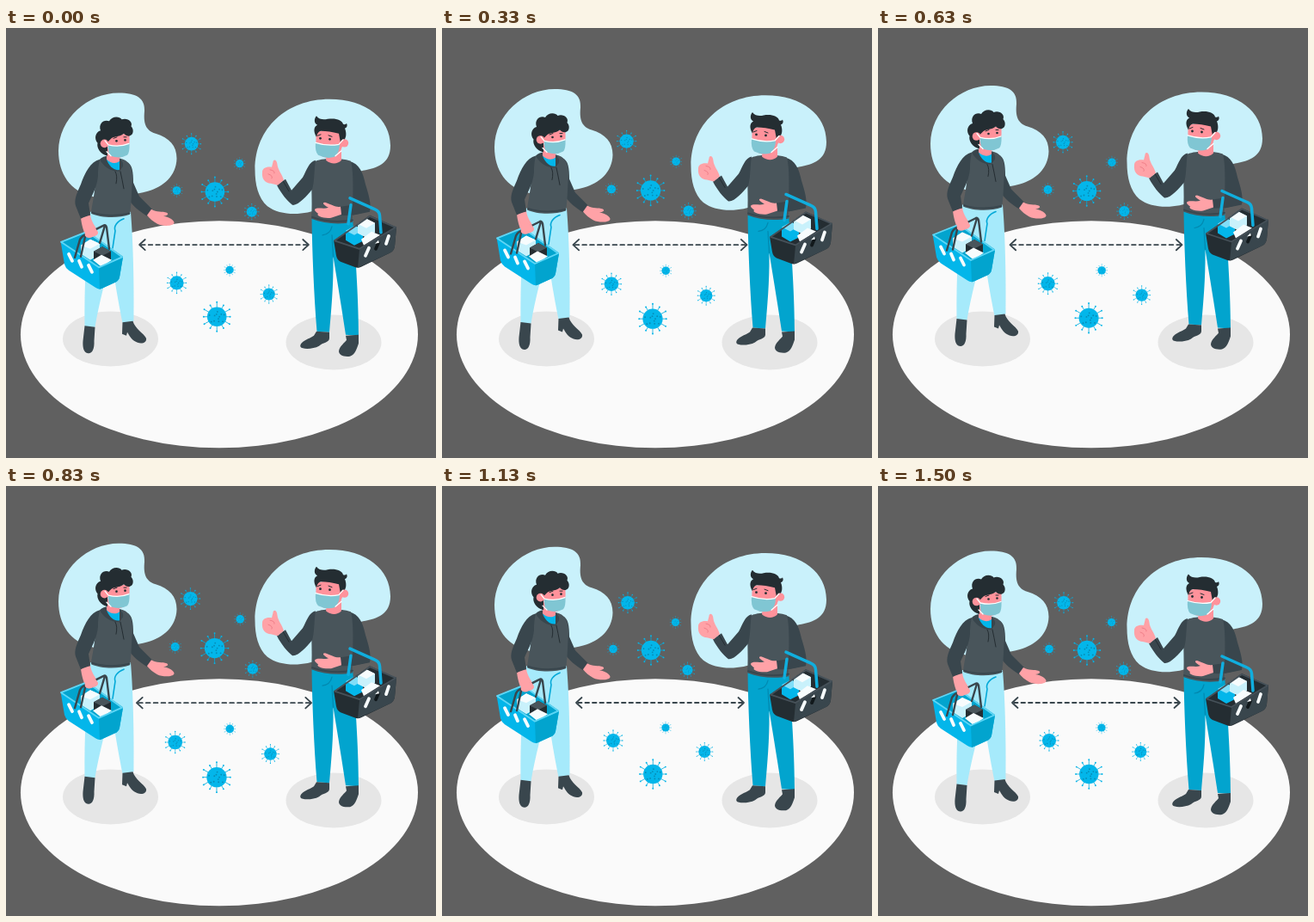
Recreate the animation shown at these times as an HTML page. Size 500 by 500 pixels, loop 1540 ms.

```html
<!DOCTYPE html>
<html lang="en">
<head>
<meta charset="utf-8">
<title>Keep your distance</title>
<style>
  html, body { margin: 0; width: 100%; height: 100%; overflow: hidden; background: #606060; }
  svg { display: block; width: 100vw; height: 100vh; }
  .blob { fill: #c9f1fb; }
  .skin { fill: #ffa2a7; }
  .face { fill: #ff929b; }
  .hair { fill: #242d32; }
  .dark { fill: #39464d; }
  .top { fill: #49555b; }
  .cyan { fill: #03b6ea; }
  .pale { fill: #a6eafb; }
  .blue { fill: #02a4ce; }
  .white { fill: #f7fcfd; }
  .mask { fill: #80c6d3; }
  .line { fill: none; stroke: #39464d; stroke-width: 1.8; stroke-linecap: round; stroke-linejoin: round; }
  .thin { stroke: #242d32; stroke-width: 1; }
  .strap { stroke: #fff; stroke-width: 1.3; }
  .fold { stroke: #04a9d8; stroke-width: 1.6; }
  .crease { stroke: #0289b0; stroke-width: 1.2; }
  .slot { stroke: #f7fcfd; stroke-width: 3.8; }
  .hole { stroke: #11181b; stroke-width: 3.8; }
  .rim { stroke: #5fd6f5; }
  .rim.night { stroke: #465159; }
  .handle { stroke-width: 2.4; }
  .handle.bright { stroke: #10aede; stroke-width: 3.5; }
</style>
</head>
<body>
<svg viewBox="0 0 500 500">
  <ellipse cx="248" cy="356.3" rx="231" ry="132" fill="#fafafa"/>
  <g fill="#e6e6e6">
    <ellipse cx="121.5" cy="361.5" rx="55.5" ry="32"/>
    <ellipse cx="381" cy="365.5" rx="55.5" ry="32"/>
  </g>

  <g class="float">
    <path class="blob" d="M61 143C61 106 95 75.600 131 75.600C152 75.600 162 82 161 97C160 109 161 119 174 123C190 128 198.500 137 198.500 152C198 172 183 185 165 190C145 195 115 200 100 196C75 190 61 170 61 143Z"/>
    <path class="blob" d="M289.500 165C289.500 116 327 82.900 376 82.900C419 82.900 447 106 447 137C447 158 432 163 415 166C392 172 385 195 365 210C347 218.500 319 219 304 207.500C293 198 289.500 182 289.500 165Z"/>
  </g>

  <g id="spread">
    <path class="line" d="M162.500 246L156 252L162.500 258M344.500 246L351 252L344.500 258"/>
    <path class="line" d="M158 252H350" stroke-dasharray="4.500 4"/>
  </g>

  <!-- person on the left -->
  <g class="float">
    <path class="pale" d="M98 214H145C148 250 149 300 148.500 341L135.500 343C132 325 127 300 122 262C117 290 108 320 103.500 348L91.500 347C91 300 93 260 98 214Z"/>
    <path class="line fold" d="M137 222C129 225 125 231 127 236L124 256"/>
    <path class="dark" d="M91.500 346.500L103.500 348L102.500 364C103 374 100 379 95.500 378.500C90 378 89 371 89.500 364Z"/>
    <path class="dark" d="M135.500 342.500L147.500 341C150 350 160 355 163 361C164 366 158 368 153 366C147 364 144 359 141 354L140 358L135 356Z"/>
    <path class="skin" d="M87 221L98 217C99 226 104 230 107 238C107 242 102 241 100 245L93 243C90 236 88 230 87 221Z"/>
    <path class="dark" d="M140 156C147 158 148 168 148 180L155 196L170 211L164 219C155 213 147 207 143 200Z"/>
    <path class="skin" d="M164 218L169 211C175 215 182 213 187 215C190 217 187 218.500 183 219C190 220 196 224 195.500 227C194 231 182 231 176 228C171 225 167 222 164 218Z"/>
    <path class="top" d="M108 154C115 150 123 150 133 152C142 154 147 160 147 175C146 190 146 205 144 217C130 222 110 221 99 216C100 205 104 190 104 175Z"/>
    <path class="line" d="M100 214.500C113 219 131 219 143.500 215.500"/>
    <path class="dark" d="M109 153C98 156 92 168 87 182C82 193 79 200 81 207L87 222C90 220 94 219 98 218L96 204C100 195 106 185 107 172C107 163 108 158 109 153Z"/>
    <path class="dark" d="M109 153Q113 149 119 149L132 167C121 167 113 161 109 153ZM132 152Q137 156 136 161L132 167Z"/>
    <path class="cyan" d="M117 153L132 154L132 165C126 167 119 160 117 153Z"/>
    <path class="line thin" d="M127 167Q130 172 128 181M133 167Q135 176 137 187"/>
    <path class="face" d="M117 140H132V155C127 159 121 157 117 153Z"/>
    <path class="face" d="M118 128L143 122C145 136 142 149 132 151C122 151 117 143 118 128Z"/>
    <path class="hair" d="M118 149C110 147 105 140 106.500 134C102 129 104 121 110 119.500C107 111 114 106 120 108.500C123 102.500 132 102.500 134.500 106.500C141 104 148 109 145.500 114.500C149 118 148 124 145 125C142 127 139 125 137 123C131 128 125 125 121 130L118 133Z"/>
    <circle class="face" cx="114.500" cy="134.500" r="4.800"/>
    <path class="mask" d="M119 136Q132 139 143.500 134Q144 145 141 148Q132 153 122 149Q118 145 119 136Z"/>
    <path class="line strap" d="M115 131L119 136Q132 139 143 134.500M117 144L122 149"/>
    <g class="hair"><circle cx="128.500" cy="131.500" r="1.300"/><circle cx="138.500" cy="130.500" r="1.300"/></g>
    <path class="line thin" d="M125 128.500L129 127M137 127L140 127"/>

    <!-- light basket -->
    <path class="blue" d="M64 249L95 237L136 266L107 281Z"/>
    <path class="blob" d="M87 253L98 246L109 251V264L98 270L87 263Z"/>
    <path class="white" d="M87 253L98 246L109 251L98 257Z"/>
    <path class="hair" d="M102 260L112 254.500L122 260V269L112 276L102 270Z"/>
    <path class="top" d="M102 260L112 254.500L122 260L112 265Z"/>
    <path class="white" d="M101 270L111 264L123 270L111 278Z"/>
    <path class="cyan" d="M63.500 248L108 278L136 266L132 290Q131 294 127 296L112 303Q108 305 104 302L73 282Q69 279 68 275Z"/>
    <path class="blue" d="M108 279L136 267L132 290Q131 294 127 296L109 304Z"/>
    <path class="line rim" d="M64 249L94 237L135 266.500L108 278.500Z"/>
    <path class="line slot" d="M73 263L77 271M85 271L88 278M96 276L100 284"/>
    <path class="line handle" d="M80 267L86 246Q88 242 93 240L113 230Q116 228 117 232L120 257M115 230L109 250M92 243L87 266"/>
    <path class="skin" d="M91 234L103 231L107 238Q106 242 101 243Q95 246 92 242Z"/>
  </g>

  <!-- person on the right -->
  <g class="float">
    <path class="blue" d="M355.500 221H403C407 270 410 320 410 358L395 357C391 330 386 300 380.500 266C381 300 378 330 376 354L361.500 353C358 310 356 260 355.500 221Z"/>
    <path class="line crease" d="M368 241Q377 240 379 231M380.500 266L379 241"/>
    <path class="dark" d="M361 353L376 354L376 361C376 366 368 366 364 370C357 374 344 374 342.500 371C341 365 352 362 358 358Z"/>
    <path class="dark" d="M395 358L410 357V367C408 373 406 380 400 382C392 383 387 380 387 376C388 370 394 366 396 363Z"/>
    <path class="dark" d="M399 155C411 158 415 168 418 182C422 195 425 205 423 214L403 218Z"/>
    <path class="top" d="M358 156C365 152 385 150 401 155C405 170 403 200 403 226C388 229 370 228 355 222C357 200 353 175 358 156Z"/>
    <path class="line" d="M356 220C370 225 388 226 403 223.500"/>
    <path class="dark" d="M360 154C352 156 350 165 345 174L332 189L325 176L315 183C320 193 327 201 333 206C340 207 350 195 356 188C359 178 358 166 360 154Z"/>
    <path class="line thin" d="M322 178L329 190"/>
    <path class="skin" d="M316 183L323 177C321 170 316 165 315.500 159C315 153 311 152 310.500 156L309 162C303 161 298 163 298 168C297 176 302 181 308 181Z"/>
    <path class="line" style="stroke:#e8707c;stroke-width:.7" d="M307 165Q313 166 312 169M305 170Q311 172 309 175"/>
    <path class="dark" d="M389 208L423 203V212Q408 219 390 218Z"/>
    <path class="skin" d="M389 208C383 209 380 206 371 203C367 203 369 206 375 209C370 211 365 209 361 210C357 211 360 214 363 216C360 219 370 222 378 221L390 217Z"/>
    <path class="face" d="M374 142H390V154C385 159 378 159 372 154Z"/>
    <path class="face" d="M361 121L390 117L391 138C388 149 379 152 372 151C362 149 359 140 361 121Z"/>
    <path class="hair" d="M361 127C357 120 358 115 362 113C358 111 358 106 361 102.500C364 107 370 107 374 106C383 104.500 391 107 392 112Q395 113 396 111Q398 115 394 117C396 122 396 127 393 131L389 134L387 123C379 121 373 120 366 120Q362 121 361 127Z"/>
    <circle class="face" cx="393.500" cy="134" r="4.700"/>
    <path class="mask" d="M360 133Q374 138 388 135Q388 145 382 150Q373 153 363 148Q359 144 360 133Z"/>
    <path class="line strap" d="M360 133.500Q374 138 387 135.500L392 130M383 149L390 143"/>
    <g class="hair"><circle cx="365.500" cy="128.500" r="1.400"/><circle cx="376.500" cy="129.500" r="1.400"/></g>
    <path class="line thin" d="M362 125.500L366 124M375 125L379 126.500"/>

    <!-- dark basket -->
    <path class="hair" d="M382 247L423 218L454 232L411 258Z"/>
    <path class="cyan" d="M395 236L406 230L415 235V248L405 253L395 247Z"/>
    <path fill="#80def8" d="M395 236L406 230L415 235L405 241Z"/>
    <path class="blob" d="M409 228L419 222L429 227V238L419 244L409 239Z"/>
    <path class="white" d="M409 228L419 222L429 227L419 233Z"/>
    <path class="white" d="M413 246L425 237L435 241L416 253Z"/>
    <path class="hair" d="M381 247L411 257L454 231L452 254Q451 260 446 262L413 278Q409 280 405 278L389 272Q385 270 384 265Z"/>
    <path class="dark" d="M411 258L454 232L452 254Q451 260 446 262L409 279Z"/>
    <path class="line rim night" d="M382 247.500L423 219L453 232L411 257Z"/>
    <path class="line slot" d="M422 256L418 265M445 242L442 251"/>
    <path class="line hole" d="M433 250L430 257"/>
    <path class="white" d="M429 251L433 247L434 250Z"/>
    <path class="line handle bright" d="M398 228L401 206M400 198L429 211Q434 213 434.500 218L436 238"/>
  </g>
</svg>
<script>
  const LOOP = 1540, CYCLE = 1510, LEAD = 12;
  const spread = document.getElementById('spread');
  const floaters = document.querySelectorAll('.float');

  function virus([x, y, r]) {
    let rays = '', knobs = '', spots = '';
    for (let i = 0; i < 12; i++) {
      const a = i * Math.PI / 6, reach = r * (i % 2 ? 1.5 : 1.36);
      const px = Math.cos(a) * reach, py = Math.sin(a) * reach;
      rays += `M0 0L${px} ${py}`;
      knobs += `<circle cx="${px}" cy="${py}" r="${r * .085}"/>`;
      const d = r * (i % 3 + 1) * .26;
      spots += `<circle cx="${Math.cos(a * 2.3) * d}" cy="${Math.sin(a * 2.3) * d}" r="${r * .08}"/>`;
    }
    return `<g transform="translate(${x} ${y})" class="cyan"><path d="${rays}" stroke="#03a9da" stroke-width="${r * .07}"/>
      <circle r="${r}"/>${knobs}<g fill="#078cb6">${spots}</g></g>`;
  }

  spread.innerHTML += [
    [216, 135.7, 7.8], [271.5, 158.5, 4.6], [199, 189.5, 4.8], [243, 191, 11.2], [285.5, 214, 6],
    [199, 296, 8], [260, 281, 4.6], [305.3, 309, 7], [245.3, 335, 11.2]
  ].map(virus).join('');

  // Double pulse: height 0..1 at phase p
  function beat(p) {
    if (p < .1) return p / .1;
    if (p < .3) return (.3 - p) / .2;
    return Math.max(0, 1 - Math.abs(p - .5) / .1);
  }

  function draw(now) {
    const p = Math.min(1, (now % LOOP + LEAD) / CYCLE);
    const lift = 10 * (1 - Math.abs(2 * p - 1));
    floaters.forEach(g => g.setAttribute('transform', `translate(0 ${-lift})`));
    spread.setAttribute('transform', `translate(253.5 248) scale(${1 + .1 * beat(p)}) translate(-253.5 -248)`);
  }

  const start = performance.now();
  function tick() {
    draw(performance.now() - start);
    requestAnimationFrame(tick);
  }
  tick();
</script>
</body>
</html>
```
